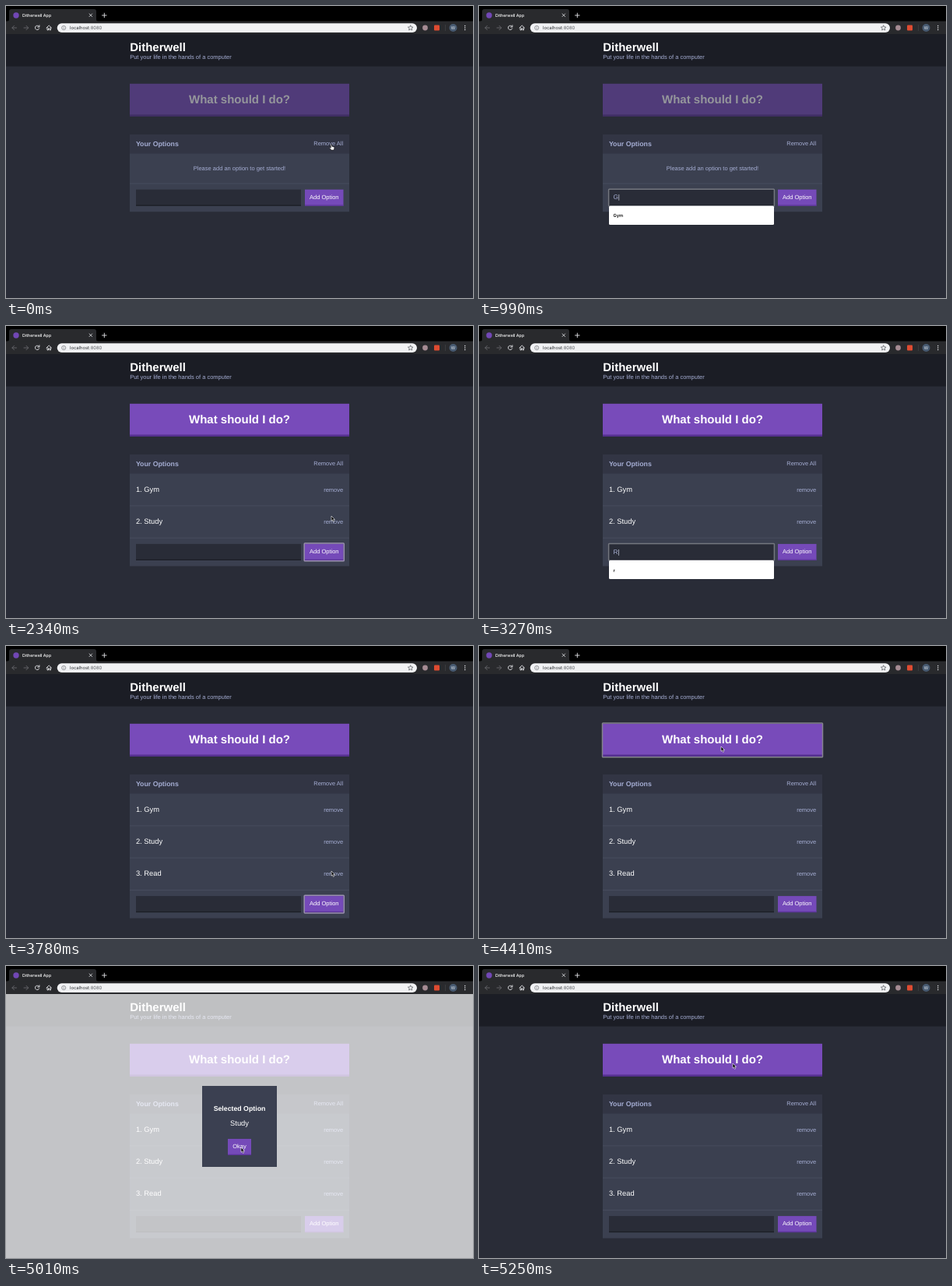
Write an HTML page that moves like this. It is 600 px wide and 375 px high and loops after 5340 ms.

```html
<!DOCTYPE html>
<html lang="en">
<head>
<meta charset="utf-8">
<title>Ditherwell App</title>
<style>
  html, body { margin: 0; width: 100%; height: 100%; overflow: hidden; background: #292c37; }
  svg { display: block; width: 600px; height: 375px; }
  text { font: 7.5px "Liberation Sans", Arial, sans-serif; fill: #a5add3; white-space: pre; text-rendering: geometricPrecision; }
  .ui { font-family: Inter, Roboto, sans-serif; }
  .line { fill: none; stroke: #e6e7ea; stroke-linecap: round; stroke-linejoin: round; }
</style>
</head>
<body>
<svg viewBox="0 0 600 375">
  <rect width="600" height="20" fill="#000"/>
  <path d="M1 20q3 0 3-3v-10q0-3 3-3h106q3 0 3 3v10q0 3 3 3z" fill="#292a2d"/>
  <rect y="19.5" width="600" height="17" fill="#292a2d"/>
  <circle cx="13" cy="12" r="3.7" fill="#7247b5"/>
  <text class="ui" x="21" y="14" style="font-size:5.3px;font-weight:500;fill:#fff">Ditherwell App</text>
  <path class="line" d="M107 10l3.6 3.6M110.6 10l-3.6 3.6" stroke-width=".8"/>
  <path class="line" d="M123.5 12h5.6M126.3 9.2v5.6" stroke-width=".9"/>
  <g class="line" stroke-width=".9">
    <path d="M13.5 28h-5.6m2.6-2.7l-2.7 2.7l2.7 2.7M23 28h5.6m-2.6-2.7l2.7 2.7l-2.7 2.7" stroke="#67686c"/>
    <path d="M42.4 26.3a2.7 2.7 0 1 0 .3 2.6M42.9 24.8v2.2h-2.2"/>
    <path d="M52 28l3.2-3l3.2 3M53 27.4v3.5h1.5v-2h1.5v2h1.4v-3.5"/>
  </g>
  <rect x="65.7" y="22.2" width="462.3" height="11.7" rx="5.85" fill="#f1f2f4"/>
  <circle cx="74.2" cy="28" r="2.6" fill="none" stroke="#5c5f64" stroke-width=".6"/>
  <path d="M74.2 27.6v1.7M74.2 26.4v.5" stroke="#5c5f64" stroke-width=".7"/>
  <text class="ui" x="82" y="30.2" style="font-size:5.85px;fill:#292b2f">localhost<tspan fill="#595c61">:8080</tspan></text>
  <path d="M519.7 24.7l.9 2.2 2.4.2-1.8 1.6.5 2.3-2-1.2-2 1.2.5-2.3-1.8-1.6 2.4-.2z" fill="none" stroke="#505359" stroke-width=".7"/>
  <circle cx="538.5" cy="28" r="3.4" fill="#a58b93"/>
  <rect x="550" y="24.6" width="7" height="7" rx="1" fill="#dd4b31"/>
  <path d="M564.5 24v8" stroke="#4b4c50" stroke-width=".5"/>
  <circle cx="574.5" cy="28" r="5" fill="#485b72"/>
  <text class="ui" x="574.5" y="30" text-anchor="middle" style="font-size:5.4px;fill:#e8edf2">W</text>
  <g fill="#e6e7ea"><circle cx="589.7" cy="25.4" r=".75"/><circle cx="589.7" cy="28" r=".75"/><circle cx="589.7" cy="30.6" r=".75"/></g>

  <rect y="36" width="600" height="41.5" fill="#1b1d25"/>
  <text x="159.2" y="58.2" style="font-size:15px;font-weight:bold;fill:#fff">Ditherwell</text>
  <text x="159.2" y="68">Put your life in the hands of a computer</text>
  <g id="app"></g>
</svg>
<script>
const LOOP = 5340, KEY_GAP = 45, BLINK = 150;
const LEFT = 159, WIDTH = 282;
const app = document.getElementById('app');

// Each entry: focus time, first key, click-to-add time, text, suggestion and how many letters it survives
const entries = [
  { focus: 690, type: 990, add: 1350, word: 'Gym', hint: 'Gym', hintLetters: 3 },
  { focus: 1650, type: 1830, add: 2310, word: 'Study' },
  { focus: 2640, type: 3270, add: 3630, word: 'Read', hint: 'r', hintLetters: 1 }
];
const PICK = 4380, MODAL_OPEN = 4470, MODAL_CLOSE = 5025;

// Pointer stops: time, x, y
const path = [
  [0, 417, 178], [150, 417, 178], [600, 350, 247], [1140, 350, 247], [1300, 418, 244],
  [1410, 418, 244], [1600, 350, 249], [2100, 350, 249], [2250, 418, 244], [2400, 418, 244],
  [2600, 350, 290], [3450, 350, 290], [3590, 418, 289], [3840, 418, 289], [4260, 311, 129],
  [4590, 311, 129], [4900, 302, 233], [5050, 302, 233], [5240, 326, 125], [LOOP, 326, 125]
];
// The pointer hides from the first key until the mouse moves again
const hidden = [[990, 1140], [1830, 2100], [3270, 3450]];

const box = (x, y, w, h, fill, more = '') =>
  `<rect x="${x}" y="${y}" width="${w}" height="${h}" fill="${fill}" ${more}/>`;
const label = (s, x, y, size = 7.5, fill = '#a5add3', anchor = 'start', weight = 400, cls = '') =>
  `<text class="${cls}" x="${x}" y="${y}" text-anchor="${anchor}" style="font-size:${size}px;fill:${fill};font-weight:${weight}">${s}</text>`;
const ring = (x, y, w, h, color = '#85848f') =>
  box(x, y, w, h, 'none', `stroke="${color}" stroke-width="1.5" rx=".8"`);
const button = (s, x, y, w) =>
  box(x, y, w, 21, '#754ab9') + box(x, y + 19.7, w, 1.3, '#5c3599') +
  label(s, x + w / 2, y + 12.1, 7.5, '#fff', 'middle');
const formTop = count => count ? 190 + 41.2 * count : 228.2;

function bigButton(enabled, focused) {
  return `<g opacity="${enabled ? 1 : .5}">` + box(LEFT, 99.8, WIDTH, 42.2, '#784bba') +
    box(LEFT, 139.5, WIDTH, 2.5, '#55308f') +
    label('What should I do?', 300, 124.8, 15, '#fff', 'middle', 700) + '</g>' +
    (focused ? ring(LEFT - .5, 99, WIDTH + 1, 43.8) : '');
}

function form(t, top, entry, addFocused) {
  const y = top + 7.5;
  let out = box(167, y, 212, 21, '#292c37') + box(167, y + 19.8, 212, 1.2, '#1b1d25') +
    button('Add Option', 384, y, 49.5);
  if (addFocused) out += ring(383.2, y - .8, 51.1, 22.6, '#9a8fb0');
  if (!entry) return out;
  const { word, type, hint, hintLetters } = entry;
  const keys = Math.min(word.length, Math.max(0, Math.floor((t - type) / KEY_GAP) + 1));
  const since = t - (keys ? type + (keys - 1) * KEY_GAP : entry.focus);
  const caret = since % (2 * BLINK) < BLINK ? '<tspan fill="#d5d8e8">|</tspan>' : '';
  out += ring(166.6, y - .4, 212.8, 21.6, '#74777f') +
    label(word.slice(0, keys) + caret, 172.4, y + 12.7, 8.3);
  if (hint && keys && keys <= hintLetters)
    out += box(167, y + 21, 212, 24.2, '#fff', 'rx="1.5"') +
      label(hint, 172.4, y + 35.6, 5.7, '#111', 'start', 600, 'ui');
  return out;
}

function widget(t, count, entry, addFocused) {
  const top = formTop(count);
  let out = box(LEFT, 165, WIDTH, top - 129, '#3b4050') + box(LEFT, 165, WIDTH, 24.6, '#323544') +
    label('Your Options', 166.9, 180, 8.775, '#a5add3', 'start', 700) +
    label('Remove All', 433.2, 179.4, 7.5, '#a5add3', 'end');
  if (!count) out += label('Please add an option to get started!', 300, 211.2, 7.5, '#a5add3', 'middle');
  for (let i = 0; i < count; i++) {
    const y = 190 + 41.2 * i;
    out += label(`${i + 1}. ${entries[i].word}`, 166.9, y + 23, 9.35, '#fff') +
      label('remove', 433.2, y + 22.5, 7.5, '#a5add3', 'end') +
      (i < count - 1 ? box(LEFT, y + 40.5, WIDTH, .8, '#4a4f61') : '');
  }
  return out + box(LEFT, top - .6, WIDTH, .8, '#4a4f61') + form(t, top, entry, addFocused);
}

const modal = () =>
  box(0, 36, 600, 339, '#fff', 'opacity=".72"') + box(252, 154, 96, 104, '#3b4051') +
  label('Selected Option', 300, 185.7, 8.775, '#fff', 'middle', 700) +
  label('Study', 300, 205.2, 9.35, '#fff', 'middle') + button('Okay', 285, 222, 30);

function pointer(t, top, open) {
  if (hidden.some(([a, b]) => t >= a && t < b)) return '';
  const i = path.findIndex(p => p[0] > t);
  const [t0, x0, y0] = path[i - 1], [t1, x1, y1] = path[i];
  const u = (t - t0) / (t1 - t0), e = u * u * (3 - 2 * u);
  const x = x0 + (x1 - x0) * e, y = y0 + (y1 - y0) * e;
  const at = `transform="translate(${x} ${y})"`;
  if (!open && x > 167 && x < 379 && y > top + 7 && y < top + 29)
    return `<path ${at} d="M-1.3-3.4q1.3 0 1.3.9v5q0 .9-1.3.9M1.3-3.4q-1.3 0-1.3.9M0 2.5q0 .9 1.3.9" fill="none" stroke="#c9cad0" stroke-width=".7"/>`;
  if (x > 394 && y > 171 && y < 183)
    return `<path ${at} d="M0 0q.9-.8 1.4.2l.3 2 2.5.7q.9.3.7 1.3l-.6 2.8h-3.4l-2.2-2.7q0-.9.9-.6l.8.6z" fill="#fff" stroke="#111" stroke-width=".6"/>`;
  return `<path ${at} d="M0 0v6.2l1.4-1.3 1 2.4 1.2-.5-1-2.3h1.9z" fill="#000" stroke="#fff" stroke-width=".6"/>`;
}

function draw(now) {
  const t = now % LOOP;
  const count = entries.filter(e => e.add <= t).length;
  const entry = entries.find(e => e.focus <= t && t < e.add);
  const addFocused = count > 0 && !entry && t < PICK;
  const open = t >= MODAL_OPEN && t < MODAL_CLOSE;
  app.innerHTML = bigButton(count > 0, t >= PICK && t < MODAL_OPEN) +
    widget(t, count, entry, addFocused) + (open ? modal() : '') +
    pointer(t, formTop(count), open);
}

function tick() {
  draw(performance.now());
  requestAnimationFrame(tick);
}
tick();
</script>
</body>
</html>
```
